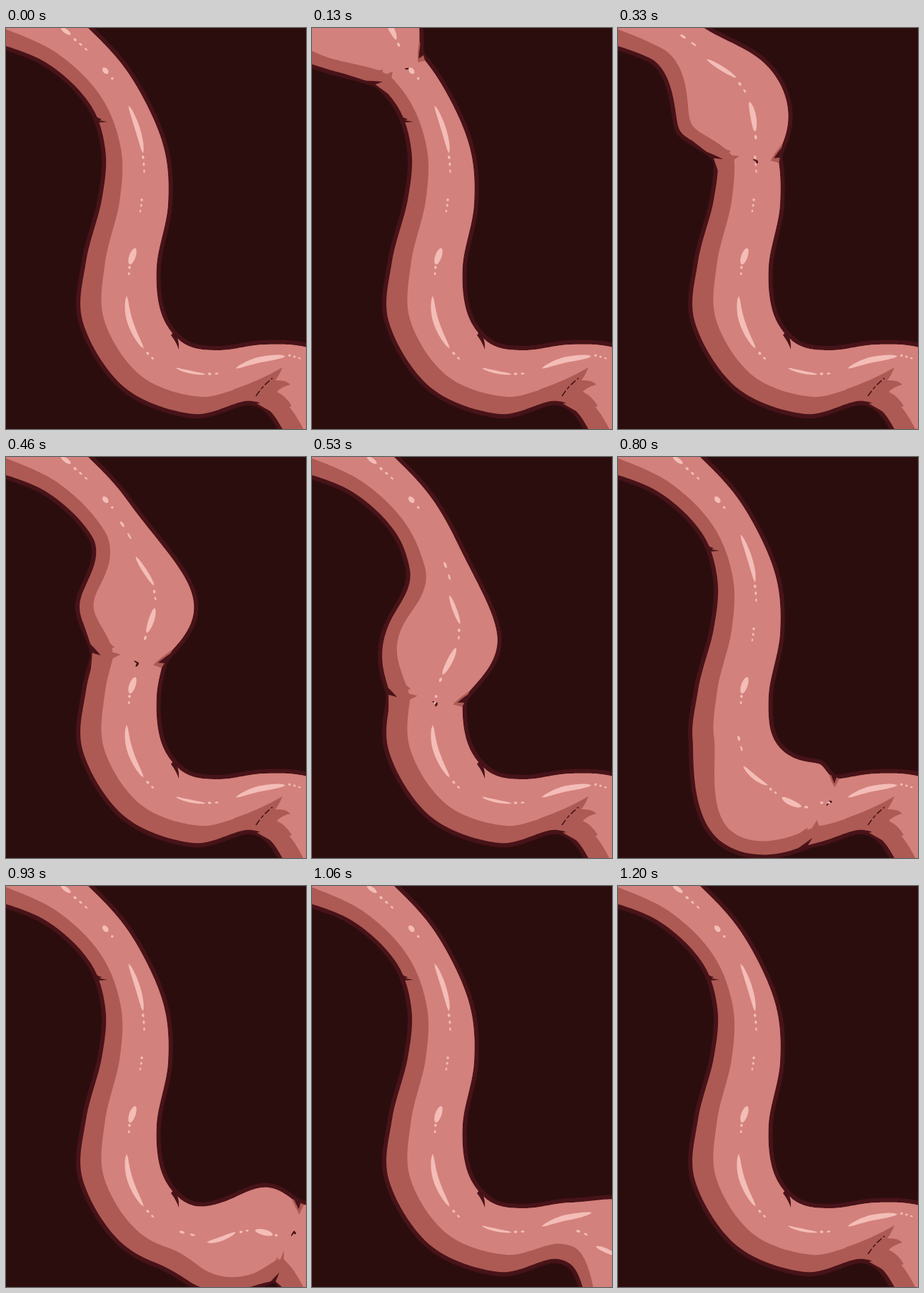
These frames come from a looping animation (420 px wide and 560 px high, 1600 ms). An HTML page with a canvas:

```html
<!DOCTYPE html>
<html lang="en">
<head>
<meta charset="utf-8">
<title>Peristalsis</title>
<style>
html, body { margin: 0; width: 100%; height: 100%; overflow: hidden; background: #2c0d0e; }
canvas { display: block; width: 420px; height: 560px; }
</style>
</head>
<body>
<canvas id="stage" width="420" height="560"></canvas>
<script>
const ctx = document.getElementById('stage').getContext('2d');
const BG = '#2c0d0e', RIM = '#471318', SHADE = '#ae5a54', FLESH = '#d3817c', SHINE = '#f4bdb7';
const LOOP = 1600, FPS = 15, LAST = 18;

// Key cross-sections of the resting tube: outer edge x, y, inner edge x, y
const TUBE = [
  [-40, 13, 55, -50], [52, 46, 115, 0], [116, 104, 174, 67], [139, 170, 219, 160],
  [134, 240, 227, 245], [112, 326, 211, 332], [108, 412, 218, 400], [166, 502, 250, 441],
  [262, 539, 298, 450], [345, 521, 362, 442], [388, 562, 425, 447], [410, 640, 500, 480]
];
const END = TUBE.length - 1;
let wave = null;

const mix = (a, b, t) => a + (b - a) * t;
const clamp = (x, lo, hi) => Math.max(lo, Math.min(hi, x));

// Catmull-Rom through the cross-sections
function station(s) {
  s = clamp(s, 0, END);
  const i = Math.min(Math.floor(s), END - 1), t = s - i;
  const a = TUBE[Math.max(i - 1, 0)], b = TUBE[i], c = TUBE[i + 1], d = TUBE[Math.min(i + 2, END)];
  return b.map((p, k) => p + t / 2 * (c[k] - a[k] +
    t * (2 * a[k] - 5 * p + 4 * c[k] - d[k] + t * (3 * (p - c[k]) + d[k] - a[k]))));
}

// The wave speeds up along the tube; its outer side pulses, its inner side shrinks
function waveAt(step) {
  if (step < 1 || step >= LAST) return null;
  const front = .7 + .425 * step + .016 * step ** 2;
  return {
    front,
    tail: front - 2.4,
    outer: 36 + 9 * Math.cos((step - 5) * Math.PI / 4),
    inner: 50 - 2 * step,
    shine: .72 - .012 * step
  };
}

// Swelling from 0 to 1, slow at the tail and steep at the front
function swell(s, length, skew) {
  const u = wave ? (s - wave.front) / length + 1 : 0;
  return u <= 0 || u >= 1 ? 0 : Math.sin(Math.PI * u ** skew) ** 1.3;
}

// Point at station s; v runs from the outer edge (0) to the inner edge (1)
function at(s, v) {
  const [lx, ly, rx, ry] = station(s);
  const width = Math.hypot(rx - lx, ry - ly);
  const from = wave ? -wave.outer * swell(s, 2.3, 1.3) / width : 0;
  const to = wave ? 1 + wave.inner * swell(s, 2.6, 1.6) / width : 1;
  const k = mix(from, to, v);
  return [mix(lx, rx, k), mix(ly, ry, k)];
}

const shadeEdge = s => at(s, .27 * (1 - .55 * swell(s, 2.3, 1.3)));

function fill(color, pts) {
  ctx.beginPath();
  pts.forEach(p => ctx.lineTo(...p));
  ctx.closePath();
  ctx.fillStyle = color;
  ctx.fill();
}

function along(edge) {
  return Array.from({ length: END * 20 + 1 }, (_, i) => edge(i / 20));
}

function drawTube() {
  const inner = along(s => at(s, 1)).reverse();
  ctx.strokeStyle = RIM;
  ctx.lineWidth = 12;
  ctx.lineJoin = 'round';
  fill(SHADE, [...along(s => at(s, 0)), ...inner]);
  ctx.stroke();
  ctx.fill();
  fill(FLESH, [...along(shadeEdge), ...inner]);
}

// Curved spike from one edge towards the middle
function blade(color, a, tip, b, bend = .5) {
  const c = p => at(mix(p[0], tip[0], bend), mix(p[1], tip[1], .75 - bend / 2));
  ctx.beginPath();
  ctx.moveTo(...at(...a));
  ctx.quadraticCurveTo(...c(a), ...at(...tip));
  ctx.quadraticCurveTo(...c(b), ...at(...b));
  ctx.fillStyle = color;
  ctx.fill();
}

// Rounded highlight that follows the tube
function streak(s0, s1, width, v0 = .64, v1 = v0, color = SHINE) {
  const up = [], down = [], n = 16;
  for (let i = 0; i <= n; i++) {
    const t = i / n, s = mix(s0, s1, t), v = mix(v0, v1, t);
    const [x, y] = at(s, v), [x2, y2] = at(s + .02, v + (v1 - v0) * .02 / (s1 - s0));
    const len = Math.hypot(x2 - x, y2 - y) || 1;
    const r = width / 2 * Math.sqrt(Math.sin(Math.PI * t) + 1e-9) / len;
    up.push([x - (y2 - y) * r, y + (x2 - x) * r]);
    down.unshift([x + (y2 - y) * r, y - (x2 - x) * r]);
  }
  fill(color, [...up, ...down]);
}

// Row of droplets
function trail(s0, s1, count, v0, v1) {
  const step = (s1 - s0) / count;
  for (let i = 0; i < count; i++) {
    const s = s0 + i * step, size = 3.6 - 1.8 * i / count;
    streak(s, s + step * .5, size, v0, v1);
  }
}

const visible = (s0, s1, pad = 0) => {
  const mid = (s0 + s1) / 2;
  return !wave || mid < wave.tail - pad || mid > wave.front + pad / 3;
};
const rest = (paint, s0, s1, ...more) => visible(s0, s1) && paint(s0, s1, ...more);

function drawRestShine() {
  rest(streak, .74, .92, 6, .7);
  rest(trail, 1, 1.35, 3, .68);
  rest(streak, 1.66, 1.78, 7, .66);
  rest(trail, 1.86, 1.94, 1, .67);
  rest(streak, 2.36, 3.14, 7, .67, .63);
  rest(trail, 3.18, 3.55, 3, .62);
  rest(trail, 3.94, 4.22, 3, .6);
  rest(streak, 4.73, 5.01, 9, .66, .62);
  rest(trail, 5.03, 5.25, 2, .62);
  rest(streak, 5.57, 6.62, 8, .6, .56);
  rest(trail, 6.7, 6.95, 2, .56);
  rest(streak, 7.33, 7.93, 4, .62);
  rest(trail, 7.97, 8.25, 2, .63);
  rest(streak, 8.5, 9.54, 8, .65, .83);
  rest(trail, 9.6, 9.95, 3, .85);
}

function drawWaveShine() {
  const v = wave.shine, s = u => mix(wave.tail, wave.front, u);
  trail(s(.03), s(.2), 2, v);
  streak(s(.27), s(.48), 6, v - .05, v + .04);
  trail(s(.51), s(.61), 2, v + .03);
  streak(s(.64), s(.82), 8, v + .02, v - .02);
  trail(s(.84), s(.9), 1, v - .02);
}

function drawCreases() {
  ctx.fillStyle = RIM;
  const cut = d => ctx.fill(new Path2D(d));
  if (visible(2.4, 2.4, .35)) cut('M120 119Q128 126 134 127L131 129L142 131L129 132Z');
  if (visible(6.7, 6.7, .35)) cut('M234 425Q243 432 242 449Q238 438 231 429ZM240 429L252 442L244 437Z');
  if (visible(9, 9, .3)) {
    ctx.fillStyle = SHADE;
    cut('M318 505Q356 492 387 474Q382 486 377 492Q392 491 398 498Q386 501 379 508Q392 514 400 528L375 538L345 521Z');
    ctx.fillStyle = RIM;
    cut('M336 526Q346 518 356 524Z');
    ctx.strokeStyle = RIM;
    ctx.lineWidth = 1.6;
    ctx.setLineDash([9, 3, 5, 3]);
    ctx.stroke(new Path2D('M350 514Q359 500 373 489'));
    ctx.setLineDash([]);
  }
}

function drawFront() {
  const f = wave.front;
  blade(SHADE, [f - .5, 0], [f - .17, .28], [f, 0]);
  blade(SHADE, [f - .15, 0], [f - .06, .37], [f + .2, 0]);
  blade(RIM, [f - .25, -.05], [f - .02, .09], [f - .06, -.05]);
  blade(SHADE, [f - .2, 1], [f + .06, .87], [f + .1, 1]);
  blade(RIM, [f - .2, 1.04], [f + .02, .93], [f + .02, 1.05]);
  streak(f + .02, f + .06, 2, .58, .66, RIM);
  streak(f + .04, f + .11, 3, .65, .63, RIM);
}

function draw(step) {
  wave = waveAt(step);
  ctx.fillStyle = BG;
  ctx.fillRect(0, 0, 420, 560);
  drawTube();
  drawCreases();
  if (wave) drawFront();
  drawRestShine();
  if (wave) drawWaveShine();
}

function tick() {
  const t = performance.now() % LOOP;
  draw(Math.min(LAST, Math.floor((t + 7) * FPS / 1000)));
  requestAnimationFrame(tick);
}
tick();
</script>
</body>
</html>
```
